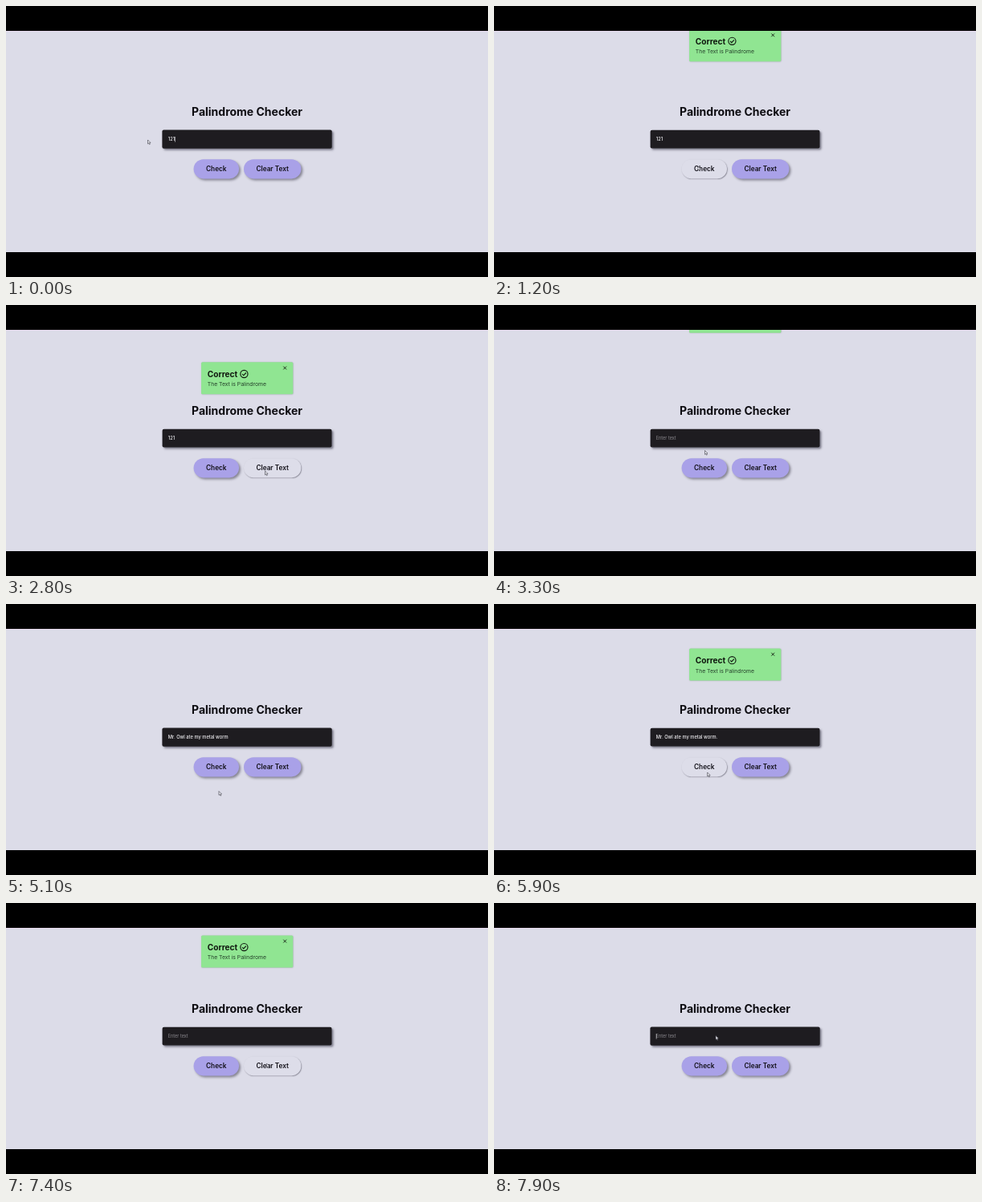
An HTML page with a canvas for the animation above (8 s loop, 600 px wide and 338 px high).

```html
<!DOCTYPE html>
<html lang="en">
<head>
<meta charset="utf-8">
<title>Palindrome Checker</title>
<style>
  html, body { margin: 0; width: 100%; height: 100%; overflow: hidden; background: #000; }
  canvas { display: block; width: 600px; height: 338px; }
</style>
</head>
<body>
<canvas id="stage"></canvas>
<script>
const W = 600, H = 338, LOOP = 8000, STEP = 100;
const TOP = 31, BOTTOM = 307;
const canvas = document.getElementById('stage');
const ctx = canvas.getContext('2d');
const dpr = window.devicePixelRatio || 1;
canvas.width = W * dpr;
canvas.height = H * dpr;

const PAGE = '#dcdce8', LILAC = '#a9a1e8';
const PHRASE = 'Mr. Owl ate my metal worm.';
const CHECK_1 = 1060, CLEAR_1 = 2930, CHECK_2 = 5650, CLEAR_2 = 7280;
const FOCUS_1 = 3700, FOCUS_2 = 7800;
const TYPE_START = 3800, TYPE_RATE = 52;
const SLIDE = 500, TRAVEL = 500;

// Pointer stops: arrival time, x, y
const STOPS = [
  [0, 176.5, 167], [800, 254, 200], [1800, 109, 236], [2200, 170, 287],
  [2700, 322.5, 207], [3300, 262.5, 181.5], [3650, 230, 164], [5100, 265, 233.5],
  [5500, 262, 203], [6300, 297, 271], [6800, 302, 184.5], [7100, 330, 204],
  [7800, 276, 165.5]
];

const clamp = v => Math.max(0, Math.min(1, v));
const mix = (a, b, p) => a + (b - a) * p;
const smooth = p => p * p * (3 - 2 * p);

// The CSS "ease" curve, cubic-bezier(.25, .1, .25, 1)
function ease(x) {
  if (x <= 0 || x >= 1) return clamp(x);
  const bez = (s, a, b) => 3 * s * (1 - s) ** 2 * a + 3 * s * s * (1 - s) * b + s ** 3;
  let lo = 0, hi = 1;
  for (let i = 0; i < 20; i++) {
    const mid = (lo + hi) / 2;
    if (bez(mid, 0.25, 0.25) < x) lo = mid; else hi = mid;
  }
  return bez(lo, 0.1, 1);
}

const slide = (t, on, off) => ease((t - on) / SLIDE) - ease((t - off) / SLIDE);

// Rests at each stop, then leaves just in time for the next
function pointerAt(t) {
  const next = STOPS.findIndex(s => s[0] > t);
  if (next < 0) return STOPS[STOPS.length - 1].slice(1);
  const [t0, x0, y0] = STOPS[next - 1], [t1, x1, y1] = STOPS[next];
  const leave = Math.max(t0, t1 - TRAVEL);
  const p = smooth(clamp((t - leave) / (t1 - leave)));
  return [mix(x0, x1, p), mix(y0, y1, p)];
}

function box(x, y, w, h, r, fill, dist, blur, alpha) {
  ctx.save();
  ctx.shadowColor = `rgba(30,28,45,${alpha})`;
  ctx.shadowOffsetX = ctx.shadowOffsetY = dist * dpr;
  ctx.shadowBlur = blur * dpr;
  ctx.fillStyle = fill;
  ctx.beginPath();
  ctx.roundRect(x, y, w, h, r);
  ctx.fill();
  ctx.restore();
}

function text(str, x, y, size, weight, color, align = 'left') {
  ctx.font = `${weight} ${size}px Inter, "Open Sans", sans-serif`;
  ctx.textAlign = align;
  ctx.fillStyle = color;
  ctx.fillText(str, x, y);
  return ctx.measureText(str).width;
}

function line(points, width, color) {
  ctx.strokeStyle = color;
  ctx.lineWidth = width;
  ctx.beginPath();
  points.forEach(([x, y]) => ctx.lineTo(x, y));
  ctx.stroke();
}

function button(label, x, w, [px, py]) {
  const y = 191.2, h = 24.2;
  const hover = px > x && px < x + w && py > y && py < y + h;
  if (hover) box(x, y, w, h, h / 2, '#dddde9', 0.7, 1.2, 0.45);
  else box(x, y, w, h, h / 2, LILAC, 2, 3, 0.45);
  text(label, x + w / 2, 205.8, 8.25, 600, '#121018', 'center');
}

function toast(shown) {
  if (shown <= 0) return;
  const ink = '#10180f';
  ctx.save();
  ctx.translate(0, -80 * (1 - shown));
  box(243, 71.3, 114.3, 40, 1.5, '#90e592', 0.3, 1.5, 0.25);
  text('Correct', 250.8, 90, 10.1, 700, ink);
  ctx.strokeStyle = ink;
  ctx.lineWidth = 1.15;
  ctx.beginPath();
  ctx.arc(296.4, 86, 4.6, 0, Math.PI * 2);
  ctx.stroke();
  line([[294.1, 86.2], [295.8, 87.8], [298.8, 84.5]], 1.15, ink);
  for (const s of [-1.9, 1.9]) line([[347.2 - s, 76.6], [347.2 + s, 80.4]], 0.9, ink);
  text('The Text is Palindrome', 250.8, 101.4, 6.8, 400, '#24402a');
  ctx.restore();
}

function fieldValue(t) {
  if (t < CLEAR_1) return '121';
  if (t < TYPE_START || t >= CLEAR_2) return '';
  return PHRASE.slice(0, Math.floor((t - TYPE_START) / TYPE_RATE));
}

function field(t) {
  const focused = t < 1000 || (t >= FOCUS_1 && t < CHECK_2) || t >= FOCUS_2;
  const grow = focused ? 0.2 : 0;
  box(194.6 - grow, 154.8 - grow, 210.9 + 2 * grow, 22.7 + 2 * grow, 2, '#1e1c20', 2, 2.5, 0.5);

  const value = fieldValue(t), x = 201.8, y = 168.3;
  let end = x;
  if (value) end += text(value, x, y, 5.75, 500, '#f0eff2');
  else text('Enter text', x, y, 5.5, 400, '#8b898e');

  const typing = t >= FOCUS_1 && t < TYPE_START + PHRASE.length * TYPE_RATE;
  if (focused && (t < 500 || t >= FOCUS_2 || (typing && end < 276))) {
    ctx.fillStyle = '#e6e5e8';
    ctx.fillRect(end, 163, 0.6, 6.6);
  }
}

function pointer(x, y) {
  ctx.save();
  ctx.translate(x, y);
  ctx.beginPath();
  [[0, 0], [0, 4.9], [1.1, 3.9], [2, 5.7], [2.8, 5.3], [2, 3.6], [3.5, 3.5]]
    .forEach(p => ctx.lineTo(...p));
  ctx.closePath();
  ctx.lineJoin = 'round';
  ctx.fillStyle = '#f0f0f6';
  ctx.fill();
  ctx.lineWidth = 0.6;
  ctx.strokeStyle = '#3c3b46';
  ctx.stroke();
  ctx.restore();
}

function draw(t) {
  ctx.setTransform(dpr, 0, 0, dpr, 0, 0);
  ctx.fillStyle = '#000';
  ctx.fillRect(0, 0, W, H);

  ctx.save();
  ctx.beginPath();
  ctx.rect(0, TOP, W, BOTTOM - TOP);
  ctx.clip();
  ctx.fillStyle = PAGE;
  ctx.fillRect(0, TOP, W, BOTTOM - TOP);
  ctx.fillStyle = '#e3d7ea';
  ctx.fillRect(0, TOP, W, 1);

  const at = pointerAt(t);
  toast(slide(t, CHECK_1, CLEAR_1) + slide(t, CHECK_2, CLEAR_2));
  text('Palindrome Checker', 300, 136.6, 14, 700, '#0e0d12', 'center');
  field(t);
  button('Check', 233.6, 56.4, at);
  button('Clear Text', 296, 71.4, at);
  const hidden = t > TYPE_START && t < 4700;
  if (!hidden) pointer(...at);
  ctx.restore();
}

const start = performance.now();
function frame() {
  const t = (performance.now() - start) % LOOP;
  draw(Math.floor(t / STEP) * STEP);
  requestAnimationFrame(frame);
}
frame();
</script>
</body>
</html>
```
